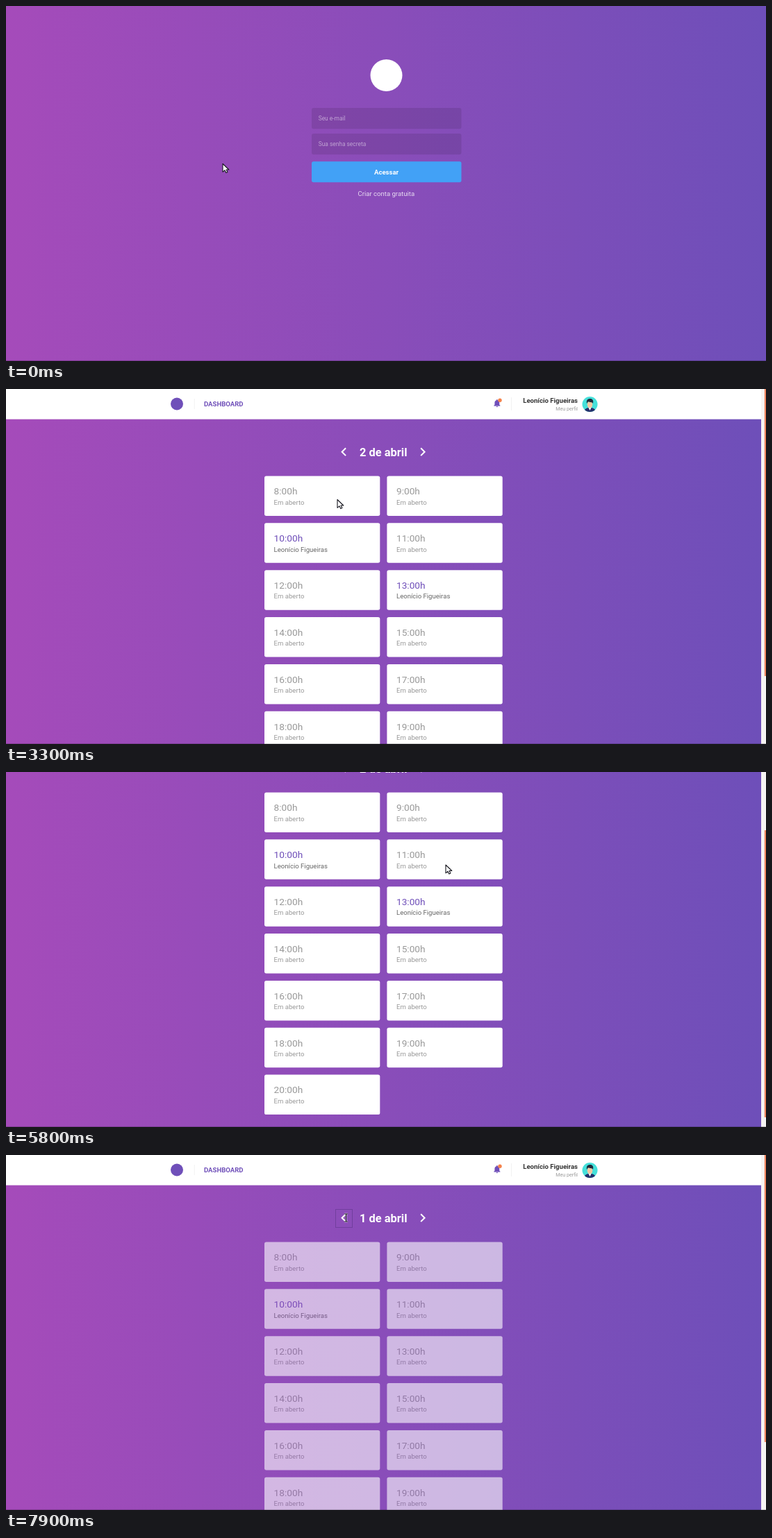
Animation, 1094 px wide and 512 px high, one loop 8 s. Source, as an HTML page:

```html
<!DOCTYPE html>
<html lang="pt-BR">
<head>
<meta charset="utf-8">
<title>Agenda</title>
<style>
html, body { margin: 0; width: 100%; height: 100%; overflow: hidden; background: #894cb9; }
svg { display: block; width: 100vw; height: 100vh; font-family: Roboto, sans-serif; font-size: 9.57px; }
text { white-space: pre; }
.bold { font-weight: 700; }
.mid { text-anchor: middle; }
.field { font-size: 8.4px; fill: #fff; }
.hint { fill: #fff; fill-opacity: .5; }
.time { font-size: 13.68px; fill: #999; }
.who { fill: #999; }
.booked .time { fill: #6f4fb9; }
.booked .who { fill: #666; }
</style>
</head>
<body>
<svg id="stage" viewBox="0 0 1094 512" preserveAspectRatio="none">
  <defs>
    <linearGradient id="bg"><stop stop-color="#a54bba"/><stop offset="1" stop-color="#6e4fb9"/></linearGradient>
    <filter id="shadow" x="-10%" y="-10%" width="120%" height="130%">
      <feDropShadow dx="0" dy="1" stdDeviation="1.5" flood-opacity=".3"/>
    </filter>
    <clipPath id="face"><circle cx="840.5" cy="22" r="11"/></clipPath>
  </defs>

  <g id="login">
    <rect width="1094" height="512" fill="url(#bg)"/>
    <circle cx="547.5" cy="100" r="23" fill="#fff"/>
    <rect x="440" y="147" width="215.5" height="30.3" rx="2.7" fill-opacity=".1"/>
    <rect x="440" y="184" width="215.5" height="30.3" rx="2.7" fill-opacity=".1"/>
    <text id="mail" class="field" x="449.7" y="165"></text>
    <text id="passHint" class="field hint" x="449.7" y="202">Sua senha secreta</text>
    <g id="dots" fill="#fff"></g>
    <rect id="caret" width=".8" height="10" fill="#fff"/>
    <rect x="440" y="224.3" width="215.5" height="30" rx="2.7" fill="#42a1f6"/>
    <text class="bold mid" x="547.5" y="242.8" fill="#fff">Acessar</text>
    <text class="mid" x="547.3" y="273.5" fill="#fff" fill-opacity=".8">Criar conta gratuita</text>
    <g id="list"></g>
  </g>

  <g id="dash">
    <rect width="1087" height="512" fill="url(#bg)"/>
    <g id="page">
      <rect width="1087" height="43.6" fill="#fff"/>
      <circle cx="246" cy="21.5" r="9" fill="#6f4fb9"/>
      <path d="M271.2 14v15M727.6 12v19" stroke="#eee" stroke-width=".8"/>
      <text class="bold" x="285" y="25.2" fill="#6f4fb9">DASHBOARD</text>
      <path transform="translate(700 13.6) scale(.57)" fill="#6f4fb9" d="M12 22c1.1 0 2-.9 2-2h-4c0 1.1.9 2 2 2zm6-6v-5c0-3.1-1.6-5.6-4.5-6.3V4c0-.8-.7-1.5-1.5-1.5s-1.5.7-1.5 1.5v.7C7.6 5.4 6 7.9 6 11v5l-2 2v1h16v-1z"/>
      <circle cx="711" cy="16.2" r="2.7" fill="#f5824a"/>
      <text class="bold" x="823" y="20" text-anchor="end" fill="#333">Leonício Figueiras</text>
      <text x="823" y="31" text-anchor="end" fill="#999" font-size="7.2">Meu perfil</text>
      <g clip-path="url(#face)">
        <rect x="829" y="10" width="23" height="24" fill="#45e0da"/>
        <path d="M832 34c0-5 3-7 8.500-7s8.500 2 8.500 7z" fill="#25306b"/>
        <path d="M838 26h5l-2.500 5z" fill="#fff"/>
        <ellipse cx="840.5" cy="22.500" rx="3.800" ry="4.800" fill="#f3c8a2"/>
        <path d="M836 21c-1-6 2-7 5-7s5 2 4 7c-1-3-6-1-7-3z" fill="#1f2a3c"/>
      </g>
      <text id="day" class="bold mid" x="543.3" y="97.300" font-size="16.4" fill="#fff"></text>
      <path transform="translate(474 78.400) scale(1.026)" fill="#fff" d="M15.4 7.4L14 6l-6 6 6 6 1.400-1.400L10.800 12z"/>
      <path transform="translate(587.6 78.400) scale(1.026)" fill="#fff" d="M10 6L8.600 7.400 13.200 12l-4.600 4.600L10 18l6-6z"/>
      <rect id="focus" x="474.5" y="78.500" width="24" height="26" fill="none" stroke="#3d2266" stroke-opacity=".65" stroke-dasharray="1 1"/>
      <g id="cards"></g>
    </g>
    <rect x="1087" width="7" height="512" fill="#f6f4f3"/>
    <rect id="thumb" x="1091.8" width="2.200" height="414" fill="#ee8560"/>
  </g>

  <rect y="511" width="1094" height="1" fill-opacity=".2"/>
  <path id="arrow" d="M0 .5V12.300L2.900 9.800 4.800 13.600 6.900 12.600 5.100 9H8.800Z" fill="#fff" stroke="#181820" stroke-width="1.100" stroke-linejoin="round"/>
  <g id="beam" fill="none">
    <path d="M-2.500-5.500H2.500M0-5.500V5.500M-2.500 5.500H2.500" stroke="#fff" stroke-opacity=".6" stroke-width="2.400"/>
    <path d="M-2.500-5.500H2.500M0-5.500V5.500M-2.500 5.500H2.500" stroke="#1c1824" stroke-width="1.200"/>
  </g>
</svg>
<script>
const LOOP = 8000, STEP = 100;
const PERSON = 'Leonício Figueiras';
const MAIL = 'leoniciofigueiras27.b@mail.example';
const SUGGESTIONS = [MAIL, 'leoniciofigueiras@mail.example', 'contato27@mail.example'];
const $ = id => document.getElementById(id);
const show = (id, on) => $(id).setAttribute('display', on ? 'inline' : 'none');
const move = (id, x, y) => $(id).setAttribute('transform', `translate(${x} ${y})`);
const setText = (id, s) => { if ($(id).textContent !== s) $(id).textContent = s; };

// Rows of [time, ...values]
const CURSOR = [
  [0, 312, 227], [300, 312, 227], [400, 313, 227], [500, 313, 227], [600, 345, 218], [700, 420, 188],
  [800, 477, 165], [3000, 477, 165], [3100, 477, 159], [4000, 477, 159], [4600, 630.5, 133],
  [4900, 632.5, 133], [5700, 632.5, 133], [5800, 633, 133.5], [6100, 633, 133.5],
  [6500, 629, 133], [6700, 560, 122], [6800, 560, 122], [7300, 488, 87],
  [7700, 488, 87], [7800, 488.5, 90.5], [7900, 489.5, 90.5]
];
const SCROLL = [
  [4900, 0], [5200, 31.4], [5600, 64], [5700, 64], [5800, 96], [5900, 107], [6000, 112],
  [6100, 112], [6500, 64.4], [6700, 0]
];
const KEYS = [2200, 2300, 2400, 2600, 2700, 2900];

function sample(rows, t) {
  const i = rows.findIndex(r => r[0] > t);
  if (i === 0) return rows[0].slice(1);
  if (i < 0) return rows[rows.length - 1].slice(1);
  const a = rows[i - 1], b = rows[i], k = (t - a[0]) / (b[0] - a[0]);
  return a.slice(1).map((v, j) => v + (b[j + 1] - v) * k);
}

$('cards').innerHTML = Array.from({ length: 13 }, (_, i) => {
  const x = 372 + (i % 2) * 176.4, y = 125.4 + (i >> 1) * 67.87;
  return `<g transform="translate(${x} ${y})">
    <rect width="166.3" height="57.5" rx="2.7" fill="#fff"/>
    <text class="time" x="13.6" y="26.800">${i + 8}:00h</text>
    <text class="who" x="13.6" y="41.300"></text></g>`;
}).join('');
const cards = [...$('cards').children];

$('dots').innerHTML = KEYS.map((_, i) => `<circle cx="${451.2 + i * 2.7}" cy="199.5" r="1"/>`).join('');
$('list').innerHTML =
  '<rect x="440" y="178" width="215.5" height="74.5" fill="#fff" filter="url(#shadow)"/>' +
  '<rect id="pick" x="440" y="178" width="215.5" height="25" fill="#d8d8dc"/>' +
  SUGGESTIONS.map((s, i) => `<text x="449.7" y="${193.5 + i * 25}" font-size="8.4" fill="#333">${s}</text>`).join('');

let day = 0;
function setDay(n) {
  if (n === day) return;
  day = n;
  setText('day', n + ' de abril');
  cards.forEach((card, i) => {
    const booked = i === 2 || (n === 2 && i === 5);
    card.setAttribute('class', booked ? 'booked' : '');
    card.setAttribute('opacity', n === 1 ? .6 : 1);
    card.querySelector('.who').textContent = booked ? PERSON : 'Em aberto';
  });
}

function drawLogin(t) {
  const filled = t >= 1800;
  const typed = KEYS.filter(k => t >= k).length;
  setText('mail', filled ? MAIL : 'Seu e-mail');
  $('mail').setAttribute('class', filled ? 'field' : 'field hint');
  show('list', t >= 1000 && !filled);
  show('pick', t >= 1600);
  show('passHint', !typed);
  [...$('dots').children].forEach((d, i) => d.setAttribute('display', i < typed ? 'inline' : 'none'));
  show('caret', t >= 1000);
  if (typed) move('caret', 450.5 + typed * 2.7, 194);
  else move('caret', filled ? 450 + $('mail').getComputedTextLength() : 449.7, 157);
}

function drawDash(t) {
  const [y] = sample(SCROLL, t);
  move('page', 0, -y);
  move('thumb', 0, y * .875);
  show('cards', t >= 3200);
  show('focus', t >= 7300);
  setDay(t >= 7500 ? 1 : 2);
}

function draw(now) {
  const t = Math.floor(now % LOOP / STEP) * STEP;
  const inside = t >= 3100;
  show('login', !inside);
  show('dash', inside);
  if (inside) drawDash(t); else drawLogin(t);
  const beam = (t >= 800 && !inside) || t >= 7800;
  show('beam', beam);
  show('arrow', !beam);
  move(beam ? 'beam' : 'arrow', ...sample(CURSOR, t));
}

const start = performance.now();
function tick() {
  draw(performance.now() - start);
  requestAnimationFrame(tick);
}
tick();
</script>
</body>
</html>
```
